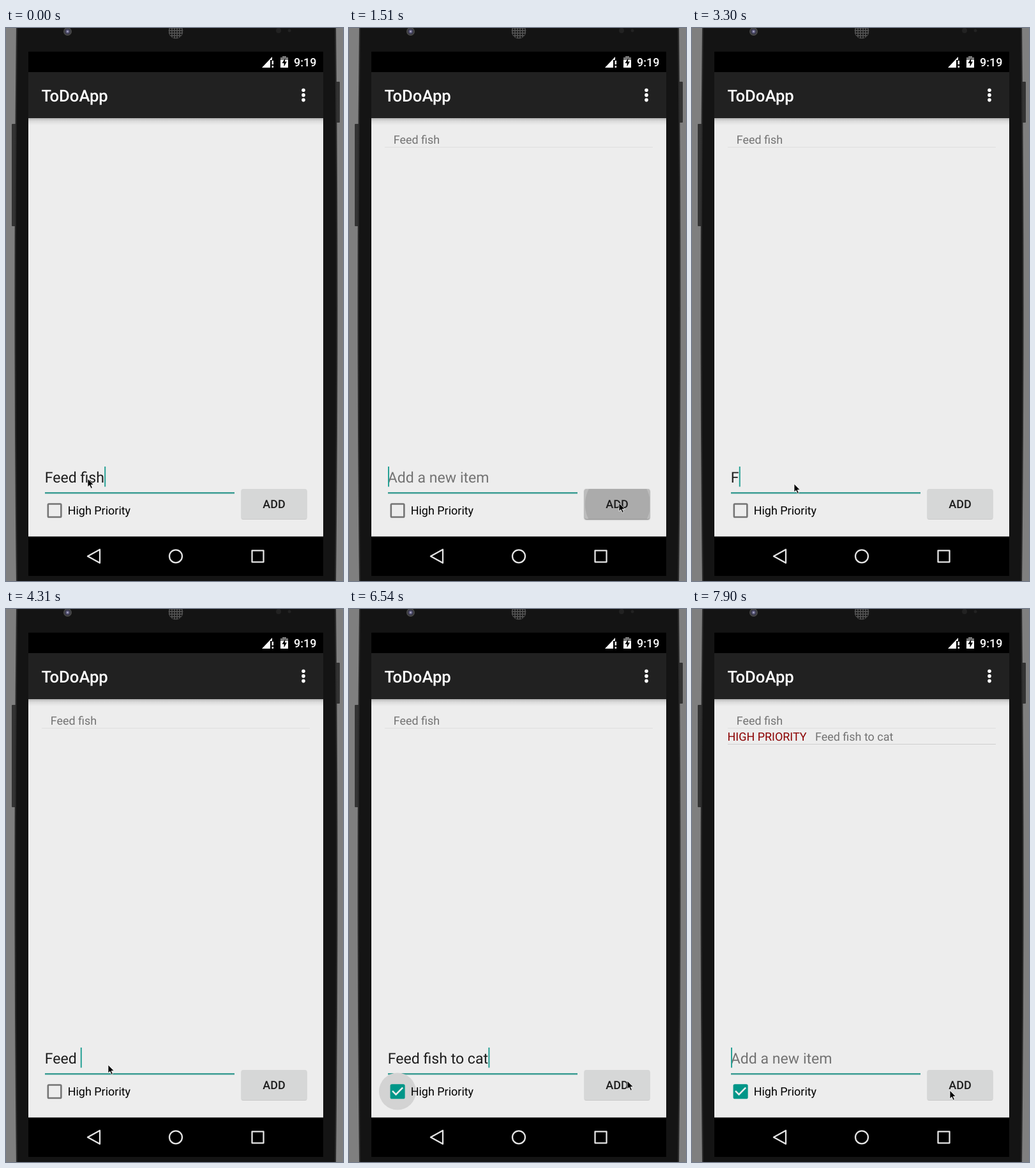
These frames come from a looping animation (528x865 px, 8 s). An HTML page:

```html
<!DOCTYPE html>
<html lang="en">
<head>
<meta charset="utf-8">
<title>To-do list</title>
<style>
  html, body { margin: 0; width: 100%; height: 100%; overflow: hidden; background: #7f7f7f; }
  svg { display: block; width: 528px; height: 865px; }
  text { font: 17.97px Roboto, sans-serif; white-space: pre; text-rendering: geometricPrecision; }
  .medium { font-weight: 500; }
  .muted { fill: #737373; }
  .field { font-size: 23.1px; }
  #press { filter: drop-shadow(0 1.5px 1.2px rgba(0, 0, 0, .4)); }
</style>
</head>
<body>
<svg viewBox="0 0 528 865">
  <defs>
    <linearGradient id="shade" x2="0" y2="1">
      <stop offset="0" stop-opacity=".24"/>
      <stop offset=".4" stop-opacity=".08"/>
      <stop offset="1" stop-opacity="0"/>
    </linearGradient>
    <radialGradient id="lens">
      <stop offset="0" stop-color="#c4c2dc"/>
      <stop offset=".45" stop-color="#5c5a7c"/>
      <stop offset="1" stop-color="#2a2a36"/>
    </radialGradient>
    <pattern id="mesh" width="4" height="4" patternUnits="userSpaceOnUse">
      <rect width="4" height="4" fill="#505050"/>
      <circle cx="2" cy="2" r="1.3" fill="#111"/>
    </pattern>
    <clipPath id="buttonClip"><rect x="369" y="721" width="102" height="47" rx="3"/></clipPath>
  </defs>

  <!-- Handset -->
  <rect width="528" height="865" fill="#7f7f7f"/>
  <rect x="9" y="150" width="7" height="160" rx="1" fill="#333"/>
  <rect x="517" y="84" width="6" height="64" rx="1" fill="#333"/>
  <path d="M17 -5Q12 432 17 870H516Q521 432 516 -5Z" fill="#141414" stroke="#2b2b2b" stroke-width="2"/>
  <circle cx="96.5" cy="5.5" r="6.5" fill="#484848"/>
  <circle cx="96.5" cy="5.5" r="4.5" fill="url(#lens)"/>
  <circle cx="266" cy="5" r="11.5" fill="url(#mesh)"/>
  <circle cx="427" cy="4" r="4" fill="#222"/>
  <circle cx="444" cy="4" r="2.5" fill="#222"/>

  <!-- Screen -->
  <rect x="35" y="37" width="462" height="820"/>
  <rect x="35" y="69" width="462" height="72" fill="#212121"/>
  <rect x="35" y="141" width="462" height="654.4" fill="#ededed"/>
  <rect x="35" y="141" width="462" height="11" fill="url(#shade)"/>
  <g fill="#fff">
    <path d="M401 62L417 45V50H414V62ZM416.500 51h2.500v6h-2.500zM416.500 59h2.500v3h-2.500z"/>
    <path d="M430 46h3v-2h6v2h3v5h-12z" fill="#777"/>
    <path d="M430 50h12v12h-12z"/>
    <path d="M437.500 47L432.500 55H435.500V60.500L440 52.500H437Z" fill="#000"/>
    <text class="medium" x="451" y="60">9:19</text>
    <text class="medium" x="55.5" y="114.8" style="font-size:25.67px">ToDoApp</text>
    <circle cx="466" cy="97.2" r="2.8"/>
    <circle cx="466" cy="104.9" r="2.8"/>
    <circle cx="466" cy="112.6" r="2.8"/>
  </g>
  <g fill="none" stroke="#e4e4e4" stroke-width="2.3" stroke-linejoin="round">
    <path d="M128 826.3L147 815.8V836.8Z"/>
    <circle cx="266" cy="826.3" r="10"/>
    <rect x="385.5" y="817.3" width="18" height="18"/>
  </g>

  <!-- List -->
  <g id="firstItem">
    <text class="muted" x="69.7" y="180.5">Feed fish</text>
    <path d="M56 186.500H476" stroke="#dfdfdf"/>
  </g>
  <g id="secondItem">
    <text x="55.5" y="206" fill="#8b0000">HIGH PRIORITY</text>
    <text class="muted" x="193" y="206">Feed fish to cat</text>
    <path d="M56 211.500H476" stroke="#cfcfcf"/>
  </g>

  <!-- Entry form -->
  <path d="M61 727.300H358" stroke="#3d9d94" stroke-width="2.5"/>
  <text id="hint" class="field muted" x="60.7" y="711">Add a new item</text>
  <text id="entry" class="field" x="60.7" y="711" fill="#1d1d1d"></text>
  <rect id="caret" y="686" width="2" height="31.5" fill="#26a195"/>
  <circle id="halo" cx="76" cy="754.5" r="29" fill="#d3d3d3"/>
  <g transform="translate(76.1 754.7) scale(1.283)">
    <rect id="boxOff" x="-8" y="-8" width="16" height="16" rx="1" fill="none" stroke="#747474" stroke-width="2"/>
    <g id="boxOn">
      <rect x="-9" y="-9" width="18" height="18" rx="2" fill="#009688"/>
      <path d="M-6.300 -.700L-2 3.600L6.300 -4.700" fill="none" stroke="#ededed" stroke-width="2"/>
    </g>
  </g>
  <text x="96.7" y="761">High Priority</text>

  <rect x="368.5" y="722" width="103" height="47" rx="3" opacity=".15"/>
  <rect x="368.5" y="721" width="103" height="47" rx="3" fill="#d6d7d7"/>
  <g id="press">
    <rect x="369" y="721" width="102" height="47" rx="3" fill="#bcbcbc"/>
    <circle id="ripple" cx="421" cy="745" fill="#ababab" clip-path="url(#buttonClip)"/>
  </g>
  <text class="medium" x="420" y="751" text-anchor="middle" fill="#1c1c1c">ADD</text>

  <path id="pointer" d="M0 0V13L3 10.300L5.200 15.300L7.400 14.300L5.200 9.600H9.300Z" stroke="#fff" stroke-width=".8"/>
</svg>

<script>
const LOOP = 8000;
const POINTER_STEP = 130;
const BLINK = 500;
const FIRST_ADD = 1375, CHECK = 6100, SECOND_ADD = 7620;

const $ = id => document.getElementById(id);
const ruler = document.createElement('canvas').getContext('2d');
ruler.font = '23.1px Roboto, sans-serif';
ruler.textRendering = 'geometricPrecision';

const clamp = v => Math.min(1, Math.max(0, v));
const ease = u => u * u * (3 - 2 * u);
const fade = (t, start, end) => t < start ? 0 : clamp((end - t) / 150);

const moves = [
  { start: 130, end: 960, x: 423, y: 743 },
  { start: 1760, end: 2470, x: 172, y: 718 },
  { start: 2470, end: 2730, x: 160, y: 713 },
  { start: 4680, end: 4940, x: 160, y: 701 },
  { start: 5660, end: 6040, x: 76, y: 750 },
  { start: 6160, end: 6500, x: 436, y: 738 },
  { start: 6500, end: 6760, x: 488, y: 743 },
  { start: 6820, end: 7020, x: 404, y: 753 }
];

const typing = [
  { start: 3210, pace: 185, text: 'Feed' },
  { start: 4310, pace: 0, text: ' ' },
  { start: 4580, pace: 85, text: 'fish to cat' }
];

function pointerAt(t) {
  let x = 128, y = 705;
  for (const move of moves) {
    const k = ease(clamp((t - move.start) / (move.end - move.start)));
    x += (move.x - x) * k;
    y += (move.y - y) * k;
  }
  return [x, y];
}

// Field contents and the moment they last changed
function entryAt(t) {
  if (t < FIRST_ADD) return { text: 'Feed fish', edited: 0 };
  if (t >= SECOND_ADD) return { text: '', edited: SECOND_ADD };
  let text = '', edited = FIRST_ADD;
  for (const part of typing) {
    [...part.text].forEach((letter, i) => {
      const time = part.start + i * part.pace;
      if (time <= t) {
        text += letter;
        edited = time;
      }
    });
  }
  return { text, edited };
}

const show = (id, opacity) => $(id).setAttribute('opacity', +opacity);

function draw(t) {
  const { text, edited } = entryAt(t);
  const added = t >= SECOND_ADD, checked = t >= CHECK;
  const pressed = t < 7000 ? 1240 : 7490;
  const released = t < 7000 ? 1840 : 7890;

  $('entry').textContent = text;
  show('hint', !text);
  $('caret').setAttribute('x', 61 + ruler.measureText(text).width);
  show('caret', (t - edited) % (2 * BLINK) < BLINK);
  show('firstItem', t >= FIRST_ADD);
  show('secondItem', added);
  show('halo', fade(t, CHECK, 6800));
  show('boxOn', checked);
  show('boxOff', !checked);
  show('press', fade(t, pressed, released));
  $('ripple').setAttribute('r', 20 + Math.max(0, t - pressed) * .115);
  const [x, y] = pointerAt(Math.floor(t / POINTER_STEP) * POINTER_STEP);
  $('pointer').setAttribute('transform', `translate(${x} ${y})`);
}

const start = performance.now();
function frame() {
  draw((performance.now() - start) % LOOP);
  requestAnimationFrame(frame);
}
frame();
</script>
</body>
</html>
```
